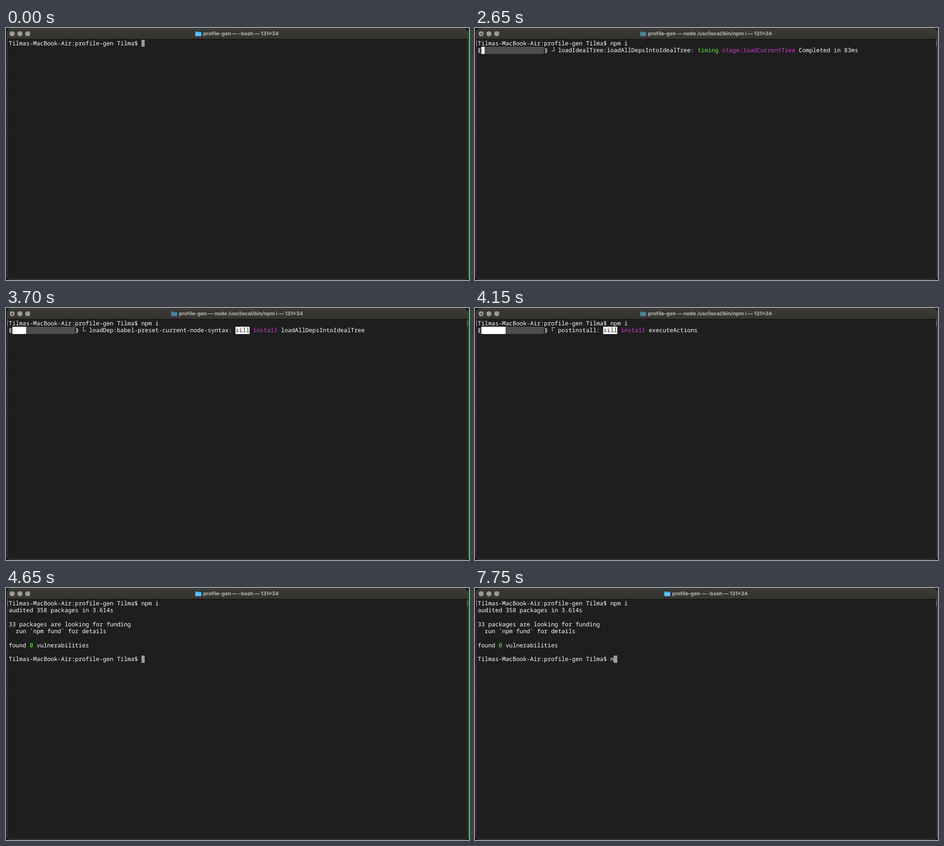
An HTML page that plays this animation: 1015x552 px, repeating every 8000 ms.

```html
<!DOCTYPE html>
<html lang="en">
<head>
<meta charset="utf-8">
<title>Terminal</title>
<style>
  html, body { margin: 0; width: 100%; height: 100%; overflow: hidden; background: #121212; }
  #stage { position: relative; width: 1015px; height: 552px; overflow: hidden; text-rendering: geometricPrecision; }
  #stage > * { position: absolute; }
  .speck { left: 0; width: 1px; height: 5px; background: #3c3c3c; }
  .strip { right: 0; top: 0; width: 1px; height: 552px; background: #0b8a14; }
  #win {
    left: 2px; top: 1px; width: 1011px; height: 550px; box-sizing: border-box;
    border: 1px solid #555452; border-radius: 8px; overflow: hidden; background: #1e1e1e;
  }
  #bar { height: 22px; background: linear-gradient(#3b3936, #363431); border-bottom: 1px solid #0c0c0c; }
  .dot { top: 7px; width: 11px; height: 11px; border-radius: 50%; background: #9c9b99; }
  #busy { left: 11.5px; top: 10.5px; width: 4px; height: 4px; border-radius: 50%; background: #3a3835; }
  #title {
    left: 0; top: 4px; width: 1013px; height: 17px; display: flex; justify-content: center; align-items: center;
    font: 700 11.2px/17px Inter, sans-serif; color: #b8b6b4; white-space: pre;
  }
  #title svg { width: 13px; height: 11px; margin-right: 4px; }
  .run #title svg { opacity: .55; }
  #busy, .mark { visibility: hidden; }
  .run #busy, .sent .mark { visibility: visible; }
  .mark { top: 28px; width: 1px; height: 10px; border: 1px solid #8a8a8a; }
  .mark.l { left: 3px; border-right: 0; }
  .mark.r { left: 1010px; border-left: 0; }
  #term {
    left: 6px; top: 26px; margin: 0; color: #fff;
    font: 500 12.75px/15.3px "Noto Sans Mono", monospace; font-variant-ligatures: none;
  }
  #term div { position: absolute; left: 0; white-space: pre; height: 15.3px; }
  #term i { position: absolute; top: 0; height: 15.3px; font-style: normal; }
  .cur { width: 7.65px; background: #9c9c9c; }
  .shade { background: repeating-conic-gradient(#747474 0 25%, #262626 0 50%) 0 0 / 2px 2px; }
  .fill { background: #fff; }
  .paren { text-shadow: 2.4px 0 #fff; }
  .spin { font: 12.75px/15.3px "DejaVu Sans Mono", monospace; }
  .sill { background: #fff; color: #1e1e1e; font-weight: 400; display: inline-block; height: 15.3px; }
  .pre { color: #d53bd3; }
  .ok { color: #62f23c; }
</style>
</head>
<body>
<div id="stage">
  <div class="speck" style="top:77px"></div>
  <div class="speck" style="top:127px"></div>
  <div class="speck" style="top:151px"></div>
  <div class="speck" style="top:175px"></div>
  <div class="speck" style="top:228px"></div>
  <div class="strip"></div>
  <div id="win"><div id="bar"></div></div>
  <div class="dot" style="left:8px"></div>
  <div class="dot" style="left:25px"></div>
  <div class="dot" style="left:42px"></div>
  <div id="busy"></div>
  <div id="title">
    <svg viewBox="0 0 13 11"><path d="M0 1.5Q0 .3 1.2 .3H4.4L5.6 1.4H11.8Q13 1.4 13 2.6V9.6Q13 10.8 11.8 10.8H1.2Q0 10.8 0 9.6Z" fill="#2f9fd6"/><rect y="2.8" width="13" height="8" rx="1" fill="#58c4f3"/></svg><span></span>
  </div>
  <div class="mark l"></div>
  <div class="mark r"></div>
  <div id="term"></div>
</div>
<script>
const LOOP = 8000, CELL = 7.65, LINE = 15.3;
const PROMPT = 'Tilmas-MacBook-Air:profile-gen Tilma$ ';
const stage = document.getElementById('stage');
const term = document.getElementById('term');
const label = document.querySelector('#title span');

const row = (n, html) => `<div style="top:${n * LINE}px">${html}</div>`;
const at = (col, cls, text = '', cells = 0) =>
  `<i class="${cls}" style="left:${col * CELL}px${cells ? `;width:${cells * CELL}px` : ''}">${text}</i>`;
const cursor = (n, col) => row(n, at(col, 'cur'));
const prompt = (n, text) => row(n, PROMPT + text) + cursor(n, PROMPT.length + text.length);
const command = row(0, PROMPT + 'npm i');

const progress = (cells, spin, stageName, task, level = 'sill', prefix = 'install') =>
  command + row(1,
    at(-0.2, 'paren', '(') + at(1, 'shade', '', 18) + at(1, 'fill', '', cells) + at(18.9, 'paren', ')') +
    at(21, 'spin', spin) + ' '.repeat(23) +
    `${stageName}: <span class="${level === 'sill' ? 'sill' : 'ok'}">${level}</span> <span class="pre">${prefix}</span> ${task}`);
const loadDep = (cells, spin, name) => progress(cells, spin, 'loadDep:' + name, 'loadAllDepsIntoIdealTree');

const IDEAL = 'loadIdealTree:loadAllDepsIntoIdealTree';
const audited = command + row(1, 'audited 358 packages in 3.614s');
const report = audited + row(3, '33 packages are looking for funding') +
  row(4, '  run `npm fund` for details') + row(6, 'found <span class="ok">0</span> vulnerabilities');
const reading = progress(1, '⠼', IDEAL, 'Completed in 83ms', 'timing', 'stage:loadCurrentTree');

// [start in ms, screen]
const steps = [
  [0, prompt(0, '')],
  [50, prompt(0, 'n')],
  [450, prompt(0, 'np')],
  [700, prompt(0, 'npm')],
  [750, prompt(0, 'npm ')],
  [950, prompt(0, 'npm i')],
  [1150, command + cursor(1, 0)],
  [2650, reading],
  [3250, progress(1, '⠴', IDEAL, 'loadIdealTree')],
  [3400, loadDep(3, '⠦', 'babel-jest')],
  [3550, loadDep(4, '⠙', 'jest-cli')],
  [3600, loadDep(4, '⠼', 'jest-config')],
  [3650, loadDep(4, '⠦', 'babel-preset-jest')],
  [3700, loadDep(4, '⠧', 'babel-preset-current-node-syntax')],
  [3750, loadDep(5, '⠏', 'jsdom')],
  [3800, loadDep(5, '⠙', 'request')],
  [3900, loadDep(6, '⠸', 'har-validator')],
  [4050, progress(6, '⠴', 'diffTrees', 'generateActionsToTake')],
  [4100, progress(7, '⠧', 'refresh-package-json:babel-preset-current-node-syntax', '', 'sill', 'refresh-package-json')],
  [4150, progress(7, '⠏', 'postinstall', 'executeActions')],
  [4200, progress(8, '⠋', 'postinstall', 'runTopLevelLifecycles')],
  [4250, progress(9, '⠹', 'prepare', 'printInstalled')],
  [4300, command + cursor(1, 0)],
  [4400, audited + cursor(2, 0)],
  [4600, report + cursor(7, 0)],
  [4650, report + prompt(8, '')],
  [7150, report + prompt(8, 'n')],
  [7300, report + prompt(8, 'np')],
  [7750, report + prompt(8, 'n')]
];

let shown = '';
function draw() {
  const t = performance.now() % LOOP;
  const screen = steps.filter(s => s[0] <= t).pop()[1];
  const running = t >= 1200 && t < 4650;
  stage.className = (running ? 'run ' : '') + (t >= 1150 ? 'sent' : '');
  const job = running ? 'node /usr/local/bin/npm i' : '-bash';
  const title = `profile-gen — ${job} — 131×34`;
  if (label.textContent !== title) label.textContent = title;
  if (screen !== shown) term.innerHTML = shown = screen;
  requestAnimationFrame(draw);
}
draw();
</script>
</body>
</html>
```
